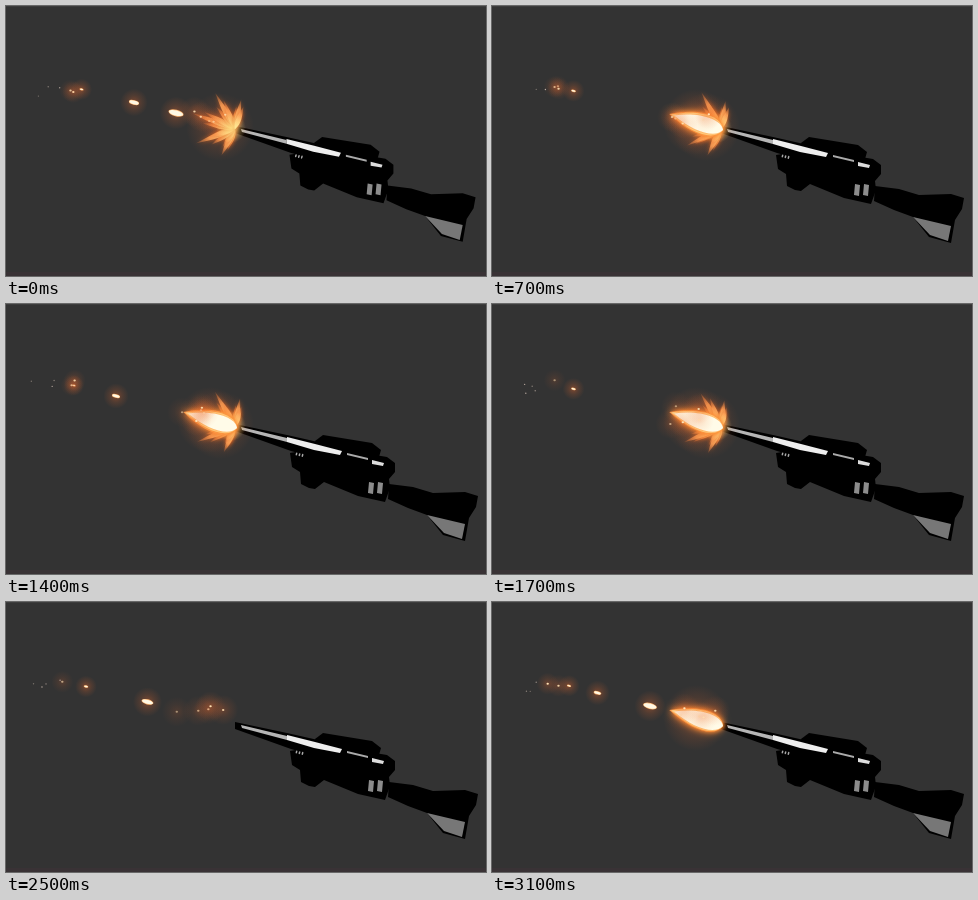
Recreate the animation shown at these times as an HTML page with a canvas. Size 480x270 px, loop 3200 ms.

```html
<!DOCTYPE html>
<html lang="en">
<head>
<meta charset="utf-8">
<title>Muzzle flash</title>
<style>
  html, body { margin: 0; width: 100%; height: 100%; overflow: hidden; background: #333; }
  canvas { display: block; width: 100vw; height: 100vh; }
</style>
</head>
<body>
<canvas id="stage" width="480" height="270"></canvas>
<script>
const ctx = document.getElementById('stage').getContext('2d');
const LOOP = 3200, STEP = 100, TAU = Math.PI * 2;
const MUZZLE = [229, 123];
const LINE_OF_FIRE = 0.25; // slope of the tracers' path

// Firing rhythm, one letter per step: F flame, S star, B both.
const RHYTHM = 'SFBSB.FBS.';
const VOLLEY = [0, 140, 345, 730, 825]; // tracer times within each second

// Repeatable noise in -1..1.
function noise(n) {
  const v = Math.sin(n * 127.1 + 11.7) * 43758.5453;
  return (v - Math.floor(v)) * 2 - 1;
}

// Time since a moment, wrapped around the loop.
const ageOf = (moment, time) => (time - moment + 2 * LOOP) % LOOP;

function poly(color, ...p) {
  ctx.fillStyle = color;
  ctx.beginPath();
  for (let i = 0; i < p.length; i += 2) ctx.lineTo(p[i], p[i + 1]);
  ctx.fill();
}

function ellipse(color, x, y, rx, ry, angle = 0) {
  ctx.fillStyle = color;
  ctx.beginPath();
  ctx.ellipse(x, y, rx, ry, angle, 0, TAU);
  ctx.fill();
}

function glow(x, y, r, alpha, rgb = '235,105,45') {
  const g = ctx.createRadialGradient(x, y, 0, x, y, r);
  g.addColorStop(0, `rgba(${rgb},${alpha})`);
  g.addColorStop(0.5, `rgba(${rgb},${alpha * 0.4})`);
  g.addColorStop(1, `rgba(${rgb},0)`);
  ellipse(g, x, y, r, r);
}

function drawGun(recoil) {
  ctx.save();
  if (recoil) {
    ctx.translate(...MUZZLE);
    ctx.scale(0.99, 0.99);
    ctx.translate(-MUZZLE[0], -MUZZLE[1]);
  }
  // barrel
  poly('#000', 229,120, 281,131, 312,138, 310,154, 285,147, 229,127);
  // receiver and grip
  poly('#000', 284,149, 302,146, 345,147, 381,153, 389,159, 389,168, 383,175,
    384,184, 379,198, 352,192, 318,178, 309,185, 303,184, 295,180, 294,168, 286,163);
  // top rail
  poly('#000', 309,137, 317,131, 366,139, 375,146, 373,153, 345,152, 312,146);
  // stock
  poly('#000', 383,180, 407,183, 427,189, 459,188, 472,192, 470,203, 463,214,
    459,237, 437,231, 421,211, 402,204, 382,195);
  poly('#777', 421,211, 459,220, 456,235, 438,229);
  // highlights
  poly('#b5b5b5', 235,123, 281,134, 281,138, 236,126);
  poly('#eee', 281,133, 309,140, 336,147, 334,151, 308,146, 281,138);
  poly('#aaa', 341,149, 362,154, 362,156, 341,151);
  poly('#ddd', 366,156, 378,159, 377,162, 366,160);
  for (const x of [362, 371]) poly('#8c8c8c', x + 1,178, x + 6,179, x + 5,190, x,189);
  for (let i = 0; i < 3; i++) ellipse('#aaa', 290.5 + i * 3, 150 + i * 0.7, 0.8, 1.6, 0.3);
  ctx.restore();
}

function petal(degrees, length, width) {
  ctx.save();
  ctx.translate(...MUZZLE);
  ctx.rotate(degrees * TAU / 360);
  const g = ctx.createLinearGradient(0, 0, length, 0);
  g.addColorStop(0, '#fff3b0');
  g.addColorStop(0.3, '#ffcf80');
  g.addColorStop(0.65, 'rgba(255,165,90,.85)');
  g.addColorStop(1, 'rgba(230,120,60,.2)');
  ctx.fillStyle = g;
  ctx.shadowColor = '#e0641e';
  ctx.shadowBlur = 4;
  ctx.beginPath();
  ctx.moveTo(0, 0);
  ctx.bezierCurveTo(length * 0.3, -width, length * 0.6, -width * 0.5, length, 0);
  ctx.bezierCurveTo(length * 0.6, width * 0.5, length * 0.3, width, 0, 0);
  ctx.fill();
  ctx.restore();
}

// Five feathered arms fanned out around the muzzle, longest in the middle.
function drawStar(step, withFlame) {
  glow(214, 121, 34, 0.35);
  for (let arm = 0; arm < 5; arm++) {
    if (withFlame && arm === 2) continue;
    const length = 29 + 15 * Math.sin(arm * Math.PI / 4);
    for (let i = 0; i < 3; i++) {
      const n = noise(step * 17 + arm * 3 + i);
      petal(116 + arm * 41 + (i - 1) * 8 + n * 3, length * (i === 1 ? 1 : 0.75) + n * 2, 4.5);
    }
  }
  glow(225, 122, 15, 0.9, '255,225,130');
}

function drawFlame(step) {
  glow(204, 116, 33, 0.4);
  ctx.save();
  ctx.translate(231, 124);
  ctx.rotate(0.29);
  ctx.shadowColor = '#ff8a30';
  const layers = [['#f9a050', 56, 14, 9], ['#ffdf95', 54, 12.5, 5], ['#fffbe8', 51, 10.5, 4]];
  layers.forEach(([color, length, width, blur], i) => {
    const w = width + noise(step + i) * 0.7;
    ctx.fillStyle = color;
    ctx.shadowBlur = blur;
    ctx.beginPath();
    ctx.moveTo(0, 0);
    ctx.bezierCurveTo(-5, -w, -28, -w, -length, 0);
    ctx.bezierCurveTo(-28, w, -5, w, 0, 0);
    ctx.fill();
  });
  ctx.restore();
}

function drawTracers(time) {
  for (let second = 0; second < LOOP; second += 1000) {
    for (const offset of VOLLEY) {
      const x = 188 - ageOf(second + offset, time) * 0.3;
      if (second + offset >= LOOP || x > 171 || x < 62) continue;
      const y = 106 + (x - 166) * LINE_OF_FIRE;
      const size = 1.2 + (x - 69) * 0.06;
      glow(x, y, 9 + size, 0.4);
      ellipse('#ffb872', x, y, size + 0.5, size * 0.38 + 0.5, LINE_OF_FIRE);
      ellipse('#fff8e4', x, y, size, size * 0.36, LINE_OF_FIRE);
    }
  }
}

// Embers appear one by one, scatter around a centre and burn out.
function drawEmbers(time, { x: cx, y: cy, spreadX, spreadY, drift, radius, seed }) {
  const every = 100, life = 500;
  for (let i = 0; i < LOOP / every; i++) {
    const age = ageOf(i * every, time);
    if (age >= life) continue;
    const n = seed + i * 3;
    const x = cx + noise(n) * spreadX - age * drift;
    const y = cy + noise(n + 1) * spreadY + age * noise(n + 2) * 0.01;
    const hot = x > 55;
    ctx.globalAlpha = 1 - age / life * 0.6;
    if (hot) glow(x, y, radius, 0.3);
    ellipse(hot ? '#ffe2b5' : '#b9aaa0', x, y, hot ? 1.2 : 0.7, hot ? 1 : 0.7);
  }
  ctx.globalAlpha = 1;
}

function draw(time) {
  const step = Math.floor(time / STEP), t = step * STEP;
  const flash = RHYTHM[step % RHYTHM.length];
  ctx.fillStyle = '#333';
  ctx.fillRect(0, 0, 480, 270);
  ctx.fillStyle = '#3d3d3d';
  ctx.fillRect(0, 0, 480, 1);
  ctx.fillStyle = '#393235';
  ctx.fillRect(0, 266, 480, 4);

  drawGun(step % 6 === 0);
  if ('SB'.includes(flash)) drawStar(step, flash === 'B');
  if ('FB'.includes(flash)) drawFlame(step);
  drawTracers(t);
  drawEmbers(t, { x: 206, y: 111, spreadX: 22, spreadY: 8, drift: 0.04, radius: 15, seed: 5 });
  drawEmbers(t, { x: 52, y: 82, spreadX: 20, spreadY: 8, drift: 0.02, radius: 11, seed: 400 });
}

const start = performance.now();
function frame() {
  draw((performance.now() - start) % LOOP);
  requestAnimationFrame(frame);
}
frame();
</script>
</body>
</html>
```
